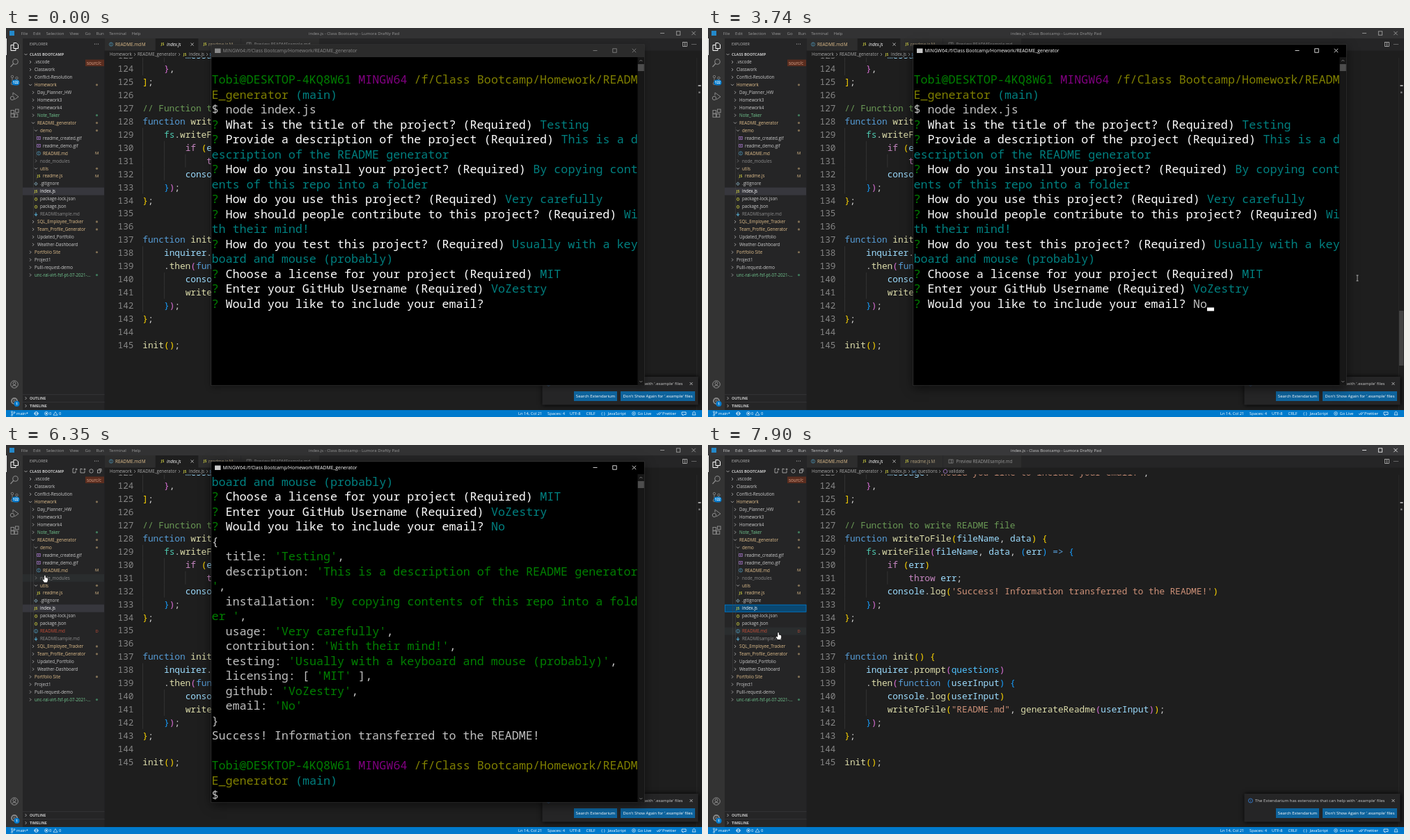
These frames come from a looping animation (1000x560 px, 8 s). An HTML page with a canvas:

```html
<!DOCTYPE html>
<html lang="en">
<head>
<meta charset="utf-8">
<title>Terminal session</title>
<style>
  html, body { margin: 0; width: 100%; height: 100%; overflow: hidden; background: #1e1e1e; }
  canvas { display: block; width: 1000px; height: 560px; }
</style>
</head>
<body>
<canvas id="stage" width="1000" height="560"></canvas>
<script>
const ctx = document.getElementById('stage').getContext('2d');
const LOOP = 8000;
const UI = '"Open Sans", "Noto Sans", sans-serif';
const MONO = '"Noto Sans Mono", "DejaVu Sans Mono", monospace';
const GOLD = '#e2c08d', GREEN = '#73c991', TEXT = '#cccccc', DIM = '#8c8c8c', BLUE = '#519aba';

// ---------- drawing helpers ----------
function rect(x, y, w, h, color) {
  ctx.fillStyle = color;
  ctx.fillRect(x, y, w, h);
}
function text(s, x, yMid, color, size = 6.2, align = 'left', style = '', font = UI) {
  ctx.font = `${style} ${size}px ${font}`;
  ctx.textAlign = align;
  ctx.fillStyle = color;
  ctx.fillText(s, x, yMid + size * 0.36);
}
// points: flat list of x,y pairs relative to (x, y)
function line(x, y, points, color, width = 0.8, close = false) {
  ctx.beginPath();
  for (let i = 0; i < points.length; i += 2) ctx.lineTo(x + points[i], y + points[i + 1]);
  if (close) ctx.closePath();
  ctx.strokeStyle = color;
  ctx.lineWidth = width;
  ctx.stroke();
}
function frame(x, y, w, h, color, width = 0.8) {
  ctx.strokeStyle = color;
  ctx.lineWidth = width;
  ctx.strokeRect(x, y, w, h);
}
function disc(x, y, r, fill, stroke, width = 0.8) {
  ctx.beginPath();
  ctx.arc(x, y, r, 0, Math.PI * 2);
  if (fill) { ctx.fillStyle = fill; ctx.fill(); }
  if (stroke) { ctx.strokeStyle = stroke; ctx.lineWidth = width; ctx.stroke(); }
}
function chevron(x, y, open, color = TEXT) {
  line(x, y, open ? [-2, -1, 0, 1, 2, -1] : [-1, -2, 1, 0, -1, 2], color, 0.7);
}
function cross(x, y, r, color) {
  line(x, y, [-r, -r, r, r], color);
  line(x, y, [r, -r, -r, r], color);
}
function dots(x, y) {
  for (const d of [-2.5, 0, 2.5]) disc(x + d, y, 0.6, TEXT);
}
function windowButtons(xs, y, color) {
  line(xs[0], y, [-3, 0, 3, 0], color);
  frame(xs[1] - 2.7, y - 2.7, 5.4, 5.4, color);
  cross(xs[2], y, 2.7, color);
}
const fileIcons = {
  js(x, y) { text('JS', x, y, '#cbcb41', 5, 'center', 'bold'); },
  json(x, y) { text('{}', x, y, '#cbcb41', 6, 'center', 'bold'); },
  info(x, y) { disc(x, y, 2.6, null, BLUE, 0.7); text('i', x, y, BLUE, 4.5, 'center', 'bold'); },
  md(x, y) { line(x, y, [0, -2.5, 0, 2, -2, 0, 0, 2, 2, 0], BLUE, 1.2); },
  gif(x, y) { frame(x - 2.3, y - 2, 4.6, 4, '#a074c4'); disc(x, y, 0.9, '#a074c4'); },
  git(x, y) { line(x, y, [0, -2, 2, 0, 0, 2, -2, 0], '#5f7680', 1.4, true); }
};

// ---------- timing ----------
const clamp = v => Math.max(0, Math.min(1, v));
const ramp = (t, a, b) => clamp((t - a) / (b - a));
const smooth = u => u * u * (3 - 2 * u);

const FOCUS = 1110, OUTPUT = 4000, PROMPT = 4140, NEW_FILE = 4610, RAISE = 7830;
const path = [
  [390, 764, 494], [650, 648, 457], [850, 648, 457], [1110, 696, 421], [1240, 696, 421],
  [1600, 932, 359], [1670, 933, 360], [5380, 933, 360], [6140, 70, 150],
  [6560, 42, 225], [6960, 94, 267], [7430, 101, 270]
];
function pointerAt(t) {
  if (t < path[0][0]) return null;
  const i = path.findIndex(p => p[0] > t);
  if (i < 0) return { x: 101, y: 270 };
  const [t0, x0, y0] = path[i - 1], [t1, x1, y1] = path[i];
  const u = smooth(ramp(t, t0, t1));
  return { x: x0 + (x1 - x0) * u, y: y0 + (y1 - y0) * u };
}
const blinkOn = [[1650, 2140], [2670, 3200], [3540, 4810], [5340, 5870], [6400, 6940], [7420, LOOP]];

// ---------- explorer ----------
// depth, kind ('>' closed, 'v' open, or file icon), label, colour, mark
const tree = [
  [1, '>', '.vscode'], [1, '>', 'Classwork'], [1, '>', 'Conflict-Resolution'],
  [1, 'v', 'Homework', GOLD, '•'],
  [2, '>', 'Day_Planner_HW'], [2, '>', 'Homework3'], [2, '>', 'Homework4'],
  [2, '>', 'Note_Taker', GREEN, '•'],
  [2, 'v', 'README_generator', GOLD, '•'],
  [3, 'v', 'demo', GOLD, '•'],
  [4, 'gif', 'readme_created.gif'], [4, 'gif', 'readme_demo.gif'], [4, 'info', 'README.md', GOLD, 'M'],
  [3, '>', 'node_modules', DIM],
  [3, 'v', 'utils', GOLD, '•'],
  [4, 'js', 'readme.js', GOLD, 'M'],
  [3, 'git', '.gitignore'], [3, 'js', 'index.js', '#ffffff'],
  [3, 'json', 'package-lock.json'], [3, 'json', 'package.json'],
  [3, 'info', 'README.md', '#c74e39', 'D'],
  [3, 'md', 'READMEsample.md', DIM],
  [2, '>', 'SQL_Employee_Tracker', GOLD, '•'], [2, '>', 'Team_Profile_Generator', GOLD, '•'],
  [2, '>', 'Updated_Portfolio'], [2, '>', 'Weather-Dashboard'],
  [1, '>', 'Portfolio Site', GOLD, '•'], [1, '>', 'Project1'], [1, '>', 'Pulll-request-demo'],
  [1, '>', 'unc-ral-virt-fsf-pt-07-2021-...', GREEN, '•']
];
const ROW = 10.95, SELECTED = 17, ADDED = 20;

function drawTree(t, pointer, hovering) {
  const rows = tree.filter((_, i) => i !== ADDED || t >= NEW_FILE);
  rows.forEach(([depth, kind, label, color = TEXT, mark], i) => {
    const y = 49 + i * ROW, x = 37 + 4 * depth, top = y - ROW / 2;
    if (i === SELECTED) {
      rect(24, top, 117, ROW, t >= RAISE ? '#094771' : '#37373d');
      if (t >= RAISE) frame(24.5, top + 0.5, 116.5, ROW - 1, '#007fd4', 0.7);
    } else if (hovering && pointer.y >= top && pointer.y < top + ROW) {
      rect(24, top, 117, ROW, '#2a2d2e');
    }
    const guideFrom = hovering ? 2 : 3;
    for (let d = guideFrom; d <= depth; d++) rect(27.3 + 4 * d, top, 0.5, ROW, '#474747');
    if (fileIcons[kind]) fileIcons[kind](x - 6, y);
    else chevron(x - 6, y, kind === 'v', color === DIM ? DIM : TEXT);
    text(label, x, y, color);
    if (mark === '•') disc(130.5, y, 1.6, color === GREEN ? '#3f7a5b' : '#806f54');
    else if (mark) text(mark, 130.5, y, color, 5.8, 'center');
  });
}

function drawSidebar(t, pointer) {
  const hovering = pointer && pointer.x > 24 && pointer.x < 141 && pointer.y > 33;
  rect(24, 15, 117.5, 535, '#252526');
  text('EXPLORER', 34, 23, '#bbbbbb', 5.4);
  dots(130, 23);
  chevron(28.5, 38, true);
  text('CLASS BOOTCAMP', 34, 38, TEXT, 5.5, 'left', 'bold');
  if (hovering) {
    line(98, 37, [2, 0, 2, 3, -2, 3, -2, -3, 0, -3], TEXT, 0.7);
    line(110, 37, [3, 0, 3, 3, -3, 3, -3, -3, 0, -2], TEXT, 0.7);
    for (const x of [101, 113]) { line(x, 35, [-1.5, 0, 1.5, 0], TEXT, 0.7); line(x, 35, [0, -1.5, 0, 1.5], TEXT, 0.7); }
    disc(122.5, 37.5, 2.7, null, TEXT, 0.7);
    frame(131.5, 36, 4, 4, TEXT, 0.7);
    line(133, 34.5, [0, 0, 4, 0, 4, 4], TEXT, 0.7);
  }
  drawTree(t, pointer, hovering);
  rect(114, 45.5, 27, 9.5, '#5a2d1f');
  text('sourc/c', 116, 50.3, '#dda58c', 6.2);
  ['OUTLINE', 'TIMELINE'].forEach((s, i) => {
    const y = 533 + i * 11;
    rect(24, y - 5.5, 117.5, 0.6, '#3f3f40');
    chevron(28.5, y, false);
    text(s, 34, y, TEXT, 5.3, 'left', 'bold');
  });
}

function badge(s, x, y, w) {
  ctx.beginPath();
  ctx.roundRect(x - w / 2, y - 4, w, 8, 4);
  ctx.fillStyle = '#007acc';
  ctx.fill();
  text(s, x, y, '#fff', 4.6, 'center', 'bold');
}

function drawActivityBar() {
  const grey = '#8a8a8a';
  rect(0, 15, 24, 535, '#333333');
  rect(0, 15, 1, 24, '#fff');
  line(12, 27, [-1, -5.5, 3, -5.5, 5.5, -3, 5.5, 2.5, -1, 2.5], '#fff', 1, true);
  line(12, 27, [-1, -2.5, -5, -2.5, -5, 5.5, 2, 5.5, 2, 2.5], '#fff', 1);
  disc(13.5, 48.5, 3.7, null, grey, 1.1);
  line(11, 51, [0, 0, -4.5, 5], grey, 1.2);
  disc(9, 70, 1.7, null, grey);
  disc(15.5, 72, 1.7, null, grey);
  disc(9, 80, 1.7, null, grey);
  line(9, 72, [0, 0, 0, 6, 6, 3, 6.5, 1.5], grey);
  badge('122', 14, 78.5, 11);
  line(10, 94, [0, 3, 0, -1, 8, 5, 2, 9], grey, 1);
  disc(9, 101, 2.7, null, grey, 1);
  for (const [x, y] of [[7, 118.5], [7, 123.7], [12.2, 123.7], [13.5, 117]]) frame(x, y, 4.6, 4.6, grey, 1);
  disc(12, 513, 5.3, null, grey, 1);
  disc(12, 511.5, 2, null, grey, 1);
  line(12, 513, [-3.5, 4, -2, 1.7, 2, 1.7, 3.5, 4], grey, 1);
  disc(12, 537, 4, null, grey, 1.8);
  disc(12, 537, 1.4, null, grey, 0.9);
  badge('1', 15.5, 541, 8);
}

// ---------- editor ----------
const FIRST = 123, PITCH = 18.92, CODE_SIZE = 12.78, CODE_W = CODE_SIZE * 0.6, CODE_X = 196.3;
const code = `        message: 'Would you like to include your email?',
    },
];

// Function to write README file
function writeToFile(fileName, data) {
    fs.writeFile(fileName, data, (err) => {
        if (err)
            throw err;
        console.log('Success! Information transferred to the README!')
    });
};


function init() {
    inquirer.prompt(questions)
    .then(function (userInput) {
        console.log(userInput)
        writeToFile("README.md", generateReadme(userInput));
    });
};

init();`.split('\n');
const bracketColors = ['#ffd700', '#da70d6', '#179fff'];
const rules = [
  [/^\/\//, '#6a9955'], [/^['"]/, '#ce9178'], [/^(function|=>)$/, '#569cd6'],
  [/^(if|throw)$/, '#c586c0'], [/^(writeToFile|writeFile|log|init|prompt|then|generateReadme)$/, '#dcdcaa'],
  [/^fs$/, '#4ec9b0'], [/^questions$/, '#4fc1ff'], [/^\w/, '#9cdcfe'], [/./, '#d4d4d4']
];

function drawCode() {
  let depth = 2;
  ctx.save();
  ctx.beginPath();
  ctx.rect(142, 42.5, 858, 507);
  ctx.clip();
  code.forEach((src, i) => {
    const y = 58.7 + (i - 1) * PITCH;
    const indent = src.search(/\S/);
    for (let c = 0; c < indent; c += 4) rect(CODE_X + c * CODE_W, y - PITCH / 2, 0.6, PITCH, '#404040');
    text(FIRST + i, 183.5, y, '#858585', CODE_SIZE, 'right', '', MONO);
    for (const m of src.matchAll(/\/\/.*|'[^']*'|"[^"]*"|=>|\w+|[^\s\w]/g)) {
      const token = m[0];
      let color = rules.find(r => r[0].test(token))[1];
      if ('([{'.includes(token)) color = bracketColors[depth++ % 3];
      else if (')]}'.includes(token)) color = bracketColors[--depth % 3];
      text(token, CODE_X + m.index * CODE_W, y, color, CODE_SIZE, 'left', '', MONO);
    }
  });
  ctx.restore();
}

function drawTabs() {
  rect(141.5, 15, 858.5, 17.5, '#252526');
  rect(141.5, 15, 73, 17.5, '#2d2d2d');
  rect(215, 15, 61, 17.5, '#1e1e1e');
  rect(276.5, 15, 61, 17.5, '#2d2d2d');
  rect(338, 15, 112, 17.5, '#2d2d2d');
  fileIcons.info(151, 23.5);
  text('README.md', 157, 23.5, GOLD, 6.4);
  text('M', 195, 23.5, GOLD);
  fileIcons.js(225, 23.5);
  text('index.js', 231, 23.5, '#fff', 6.2, 'left', 'italic');
  cross(267.5, 23.5, 2, '#ddd');
  fileIcons.js(286, 23.5);
  text('readme.js', 291, 23.5, '#b5a37f');
  text('M', 320.5, 23.5, '#b5a37f');
  frame(346, 21, 6, 5, DIM, 0.7);
  rect(349, 21, 0.7, 5, DIM);
  text('Preview READMEsample.md', 356.5, 23.5, '#969696');
  frame(972.5, 20.5, 6, 6, TEXT, 0.7);
  rect(975.2, 20.5, 0.7, 6, TEXT);
  dots(988.5, 23.5);

  const crumb = '#a9a9a9';
  text('Homework', 149, 38, crumb);
  text('README_generator', 189, 38, crumb);
  fileIcons.js(257, 38);
  text('index.js', 263, 38, crumb);
  text('[ø]', 296, 38, '#75beff', 5.4, 'center');
  text('questions', 301.5, 38, crumb);
  line(341, 38, [0, -3, 2.6, -1.5, 2.6, 1.5, 0, 3, -2.6, 1.5, -2.6, -1.5], '#b180d7', 0.8, true);
  text('validate', 346, 38, crumb);
  for (const x of [185, 249, 289, 333]) chevron(x, 38, false, crumb);
}

function drawNotice() {
  ctx.save();
  ctx.shadowColor = '#000';
  ctx.shadowBlur = 6;
  rect(770.5, 502, 224, 40.5, '#252526');
  ctx.restore();
  disc(779.5, 512, 3, null, '#3794ff', 0.7);
  text('i', 779.5, 512, '#3794ff', 4.8, 'center');
  text("The Extendarium has extensions that can help with '.example' files", 786, 512.3, TEXT, 6.05);
  cross(984.5, 512, 2, TEXT);
  rect(816, 523, 62, 14, '#0e639c');
  text('Search Extendarium', 847, 530, '#fff', 6, 'center');
  rect(883, 523, 107, 14, '#0e639c');
  text("Don't Show Again for '.example' files", 936.5, 530, '#fff', 5.95, 'center');
}

function drawEditor(t) {
  rect(141.5, 15, 858.5, 535, '#1e1e1e');
  drawTabs();
  drawCode();
  rect(992.3, 43, 0.6, 507, '#2c2c2c');
  rect(994.5, 82, 4, 2, '#a0a0a0');
  rect(995, 91.5, 2.5, 2.5, '#777');
  const shown = ramp(t, 1640, 1740) * (1 - ramp(t, 5400, 6100));
  rect(993, 407, 6.5, 79, `rgba(121,121,121,${0.4 * shown})`);
  drawNotice();
}

function drawTitleBar(active) {
  const color = active ? TEXT : '#999999';
  rect(0, 0, 1000, 15, active ? '#38383a' : '#323233');
  rect(5, 4, 7, 7, '#2489ca');
  const menu = { File: 26.5, Edit: 44.5, Selection: 70.5, View: 98, Go: 117.5, Run: 135, Terminal: 160.5, Help: 187 };
  for (const name in menu) text(name, menu[name], 7.5, color, 6.1, 'center');
  text('index.js - Class Bootcamp - Lumora Draftly Pad', 500, 7.5, color, 6, 'center');
  windowButtons([943, 966, 988], 7.5, active ? '#fff' : '#aaa');
}

function drawStatusBar() {
  const y = 555, w = '#fff';
  rect(0, 550, 1000, 10, '#007acc');
  disc(8.5, 552.7, 1, null, w, 0.6);
  disc(8.5, 557.5, 1, null, w, 0.6);
  disc(12, 553.5, 1, null, w, 0.6);
  line(8.5, y, [0, -1.3, 0, 1.5, 3.3, -0.5], w, 0.6);
  disc(43.5, y, 2.4, null, w);
  line(43.5, y, [-3.5, 0, 3.5, 0], w, 0.7);
  disc(58, y, 2.5, null, w, 0.6);
  cross(58, y, 1, w);
  line(71, y, [0, -2.5, 3, 2.3, -3, 2.3], w, 0.6, true);
  const items = [['main*', 15], ['0', 62], ['0', 76], ['Ln 14, Col 21', 736], ['Spaces: 4', 778], ['UTF-8', 810],
    ['CRLF', 833.5], ['{ }', 855], ['JavaScript', 864.5], ['Go Live', 907.5], ['Prettier', 943]];
  for (const [s, x] of items) text(s, x, y, w, 5.8);
  disc(902, y, 2.4, null, w, 0.6);
  disc(902, y, 0.8, w);
  for (const x of [937, 939.5]) line(x, y, [-2, 0, -0.7, 1.7, 2.3, -2], w, 0.7);
  line(974, y, [-3, -2, 3, -2, 3, 1.5, 0, 1.5, -1.5, 3, -1.5, 1.5, -3, 1.5], w, 0.7, true);
  line(988.5, y, [-2.5, 2, -1.7, 0.5, -1.7, -1.5, 0, -2.7, 1.7, -1.5, 1.7, 0.5, 2.5, 2], w, 0.7, true);
}

// ---------- terminal ----------
const COLS = 61, ROWS = 22, CELL_W = 10.04, CELL_H = 21.5, TERM_X = 295.4, TERM_Y = 42.2;
const ink = { g: '#008000', p: '#800080', o: '#808000', t: '#008080', s: '#c0c0c0', w: '#ffffff' };
const ask = (q, a) => `g? |w${q} |t${a}`;
const prop = (k, v, tail = ',') => `s  ${k}: |g'${v}'|s${tail}`;
const shell = 'gTobi@DESKTOP-4KQ8W61 |pMINGW64 |o/f/Class Bootcamp/Homework/README_generator |t(main)';
const session = [
  's', shell, 's$ node index.js',
  ask('What is the title of the project? (Required)', 'Testing'),
  ask('Provide a description of the project (Required)', 'This is a description of the README generator'),
  ask('How do you install your project? (Required)', 'By copying contents of this repo into a folder'),
  ask('How do you use this project? (Required)', 'Very carefully'),
  ask('How should people contribute to this project? (Required)', 'With their mind!'),
  ask('How do you test this project? (Required)', 'Usually with a keyboard and mouse (probably)'),
  ask('Choose a license for your project (Required)', 'MIT'),
  ask('Enter your GitHub Username (Required)', 'VoZestry'),
  ask('Would you like to include your email?', ''),
  's{',
  prop('title', 'Testing'),
  prop('description', 'This is a description of the README generator'),
  prop('installation', 'By copying contents of this repo into a folder '),
  prop('usage', 'Very carefully'),
  prop('contribution', 'With their mind!'),
  prop('testing', 'Usually with a keyboard and mouse (probably)'),
  "s  licensing: [ |g'MIT'|s ],",
  prop('github', 'VoZestry'),
  prop('email', 'No', ''),
  's}', 'sSuccess! Information transferred to the README!', 's', shell, 's$'
];
const ASK_ROW = 16, ASK_COL = 40;

// Wrap coloured lines at the terminal width into rows of [column, text, colour].
const rows = session.flatMap(src => {
  const out = [[]];
  let col = 0;
  for (const part of src.split('|')) {
    let rest = part.slice(1);
    while (rest) {
      if (col === COLS) { out.push([]); col = 0; }
      const piece = rest.slice(0, COLS - col);
      out[out.length - 1].push([col, piece, ink[part[0]]]);
      col += piece.length;
      rest = rest.slice(piece.length);
    }
  }
  return out;
});

function cells(s, col, row, color) {
  ctx.font = `${CELL_W / 0.6}px ${MONO}`;
  ctx.textAlign = 'left';
  ctx.fillStyle = color;
  ctx.fillText(s, TERM_X + col * CELL_W, TERM_Y + 16.3 + row * CELL_H);
}

function drawTerminal(t) {
  const active = t >= FOCUS;
  ctx.save();
  ctx.shadowColor = active ? 'rgba(0,0,0,.6)' : 'rgba(0,0,0,.4)';
  ctx.shadowBlur = active ? 14 : 8;
  ctx.shadowOffsetY = active ? 3 : 2;
  rect(295, 24, 622, 490.5, '#000');
  ctx.restore();
  if (!active) rect(295, 24, 622, 18, '#2b2b2b');
  frame(294.8, 23.8, 622.4, 491, '#3a3a3a', 0.6);
  rect(300, 29.5, 8.5, 6.5, active ? '#c8c8c8' : '#8a8a8a');
  text('MINGW64:/f/Class Bootcamp/Homework/README_generator', 311.5, 33, active ? '#fff' : '#8a8a8a', 6.8);
  windowButtons([846.5, 874.5, 902.5], 32.5, active ? '#fff' : '#8a8a8a');
  rect(907.5, 42, 9.5, 472.5, '#171717');
  rect(907.8, 52, 9, 10, '#4d4d4d');
  line(912.3, 47, [-2, 1, 0, -1, 2, 1], '#888');
  line(912.3, 509, [-2, -1, 0, 1, 2, -1], '#888');

  const top = t < OUTPUT ? 0 : t < PROMPT ? 10 : 13;
  const end = t < OUTPUT ? ASK_ROW + 1 : top + ROWS;
  const typed = 'No'.slice(0, t < 3540 ? 0 : t < 3740 ? 1 : 2);
  for (let r = top; r < end; r++) for (const [col, s, color] of rows[r]) cells(s, col, r - top, color);
  cells(typed, ASK_COL, ASK_ROW - top, t < OUTPUT ? ink.s : ink.t);

  if (blinkOn.some(([a, b]) => t >= a && t < b)) {
    const col = t < OUTPUT ? ASK_COL + typed.length : t < PROMPT ? 0 : 2;
    const row = t < OUTPUT ? ASK_ROW : ROWS - 1;
    rect(TERM_X + col * CELL_W, TERM_Y + (row + 1) * CELL_H - 5.3, CELL_W, 5, '#fff');
  }
}

// ---------- pointer ----------
function shape(x, y, points) {
  line(x, y, points, '#000', 1, true);
  ctx.fillStyle = '#fff';
  ctx.fill();
}
function drawPointer(t, { x, y }) {
  const pressed = (t >= FOCUS && t < 1240) || (t >= RAISE && t < 7895);
  if (pressed) disc(x, y + 1, 7, 'rgba(190,168,10,.95)');
  const overTerminal = t < RAISE && x >= 295 && x <= 917 && y >= 24 && y <= 515;
  if (!overTerminal && x > 141) {
    line(x, y, [-1.5, -4, 1.5, -4], '#ddd', 0.7);
    line(x, y, [0, -4, 0, 4], '#ddd', 0.7);
    line(x, y, [-1.5, 4, 1.5, 4], '#ddd', 0.7);
  } else if (!overTerminal && x > 24 && y > 43) {
    shape(x, y, [-0.7, 0, 0.7, 0, 0.9, 3.2, 4, 4, 4.3, 6.5, 3.2, 10, -1, 10, -3.3, 6.5, -2.5, 5.6, -0.9, 6.8]);
  } else {
    shape(x, y, [0, 0, 0, 8.6, 2, 6.8, 3.4, 10, 4.8, 9.4, 3.5, 6.3, 6.2, 6.2]);
  }
}

// ---------- loop ----------
function draw(t) {
  const pointer = pointerAt(t);
  ctx.textBaseline = 'alphabetic';
  drawEditor(t);
  drawSidebar(t, pointer);
  drawActivityBar();
  drawTitleBar(t >= RAISE);
  drawStatusBar();
  if (t < RAISE) drawTerminal(t);
  if (pointer) drawPointer(t, pointer);
}
const start = performance.now();
function tick() {
  draw((performance.now() - start) % LOOP);
  requestAnimationFrame(tick);
}
tick();
</script>
</body>
</html>
```
